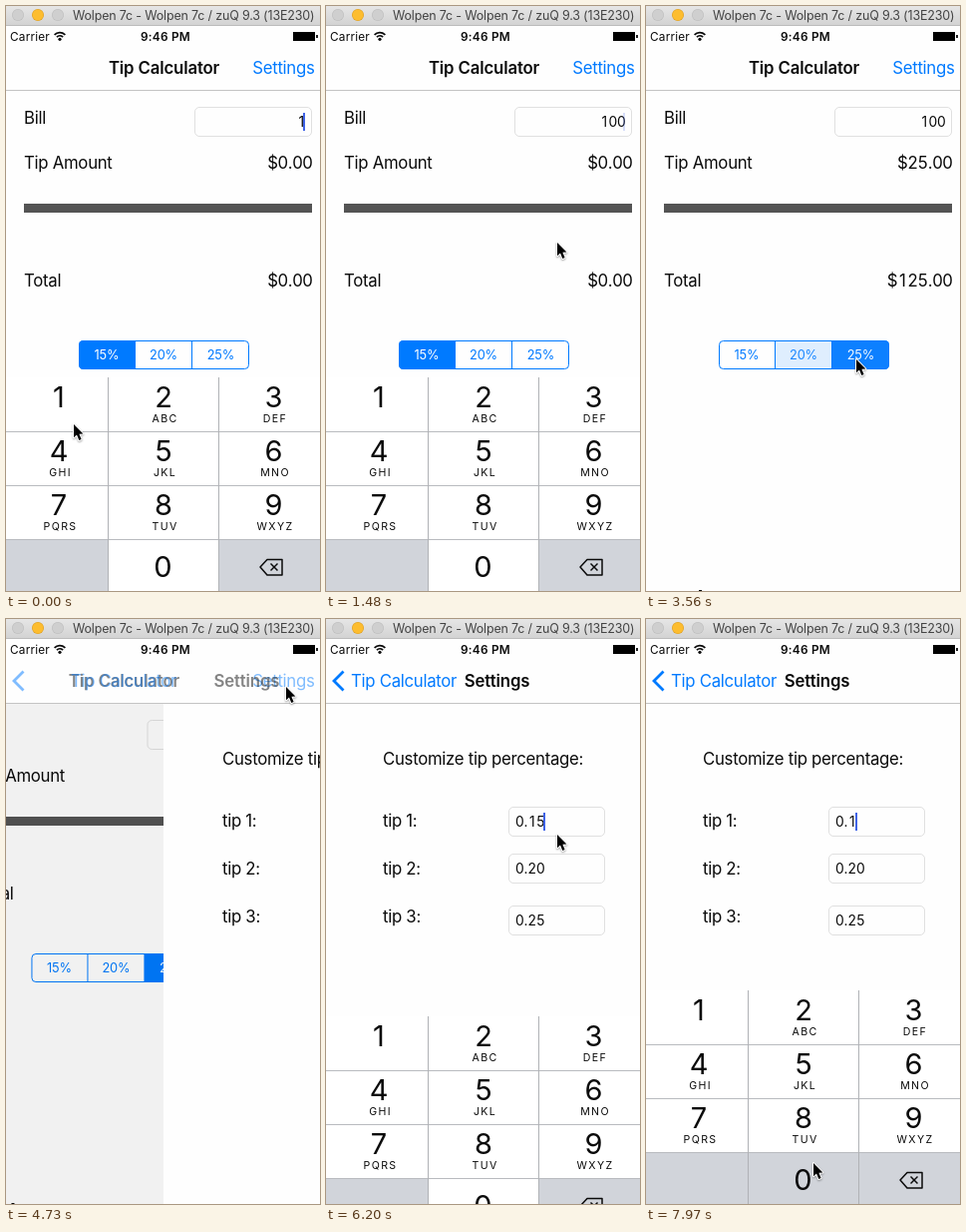
These frames come from a looping animation (315x586 px, 8 s). An HTML page with a canvas:

```html
<!DOCTYPE html>
<html lang="en">
<head>
<meta charset="utf-8">
<title>Tip Calculator</title>
<style>
html, body { margin: 0; width: 100%; height: 100%; overflow: hidden; background: #fefefe; }
canvas { display: block; width: 315px; height: 586px; }
</style>
</head>
<body>
<canvas id="stage"></canvas>
<script>
const W = 315, H = 586, LOOP = 8000, STEP = 147.75;
const BLUE = '#007aff', PAPER = '#fefefe', INK = '#0a0a0a', KEY_GREY = '#d1d4da';
const canvas = document.getElementById('stage');
const ratio = window.devicePixelRatio || 1;
canvas.width = W * ratio;
canvas.height = H * ratio;
const ctx = canvas.getContext('2d');

// Moments of the interaction, in ms
const DISMISS = 1625, PICK_20 = 2500, PICK_25 = 3302, PUSH = 4623, FOCUS = 5977, ERASE = 7640;
const zeroPresses = [[620, 800], [900, 1060], [7940, 8000]];
const erasePresses = [[7440, ERASE]];

const pointerPath = [
  [0, 68, 419], [140, 68, 419], [600, 159, 556], [1070, 159, 556], [1470, 232, 237],
  [1800, 232, 237], [2420, 159, 352], [2760, 159, 352], [3200, 211, 354], [3640, 211, 354],
  [4350, 281, 68], [5060, 281, 68], [5740, 232, 216], [6380, 232, 216], [7080, 264, 558],
  [7650, 264, 558], [7950, 168, 545], [8000, 168, 545]
];

const clamp = v => Math.max(0, Math.min(1, v));
const mix = (a, b, p) => a + (b - a) * p;
const within = (t, spans) => spans.some(([from, to]) => t >= from && t < to);
const money = v => '$' + v.toFixed(2);

// Critically damped spring, 0 to 1
function spring(t, start) {
  const x = Math.max(0, t - start) * 0.016;
  return 1 - (1 + x) * Math.exp(-x);
}

function pointerAt(t) {
  const i = Math.max(1, pointerPath.findIndex(p => p[0] >= t));
  const [t0, x0, y0] = pointerPath[i - 1], [t1, x1, y1] = pointerPath[i];
  const p = clamp((t - t0) / (t1 - t0)), e = p * p * (3 - 2 * p);
  return [mix(x0, x1, e), mix(y0, y1, e)];
}

function setType(size, weight, track) {
  ctx.font = `${weight} ${size}px Inter, Roboto, sans-serif`;
  ctx.letterSpacing = track + 'px';
}

function text(str, x, y, { size = 16.8, color = INK, weight = 400, align = 'left', track = -0.3 } = {}) {
  setType(size, weight, track);
  ctx.textAlign = align;
  ctx.fillStyle = color;
  ctx.fillText(str, x, y);
}

// Numbers with digits of equal width; returns the total width
function figures(str, x, y, { size = 16.8, align = 'left', track = -0.4 } = {}) {
  setType(size, 400, track);
  const widthOf = c => ctx.measureText(c).width;
  const cells = [...str].map(c => /\d/.test(c) ? widthOf('0') : widthOf(c));
  const total = cells.reduce((sum, w) => sum + w, 0);
  let left = align === 'right' ? x - total : x;
  ctx.textAlign = 'left';
  ctx.fillStyle = INK;
  [...str].forEach((c, i) => {
    ctx.fillText(c, left + (cells[i] - widthOf(c)) / 2, y);
    left += cells[i];
  });
  return total;
}

function box(x, y, w, h, color) {
  ctx.fillStyle = color;
  ctx.fillRect(x, y, w, h);
}

function outline(x, y, w, h, color, r = 4.5) {
  ctx.beginPath();
  ctx.roundRect(x + 0.5, y + 0.5, w - 1, h - 1, r);
  ctx.strokeStyle = color;
  ctx.lineWidth = 1;
  ctx.stroke();
}

function polyline(points, close) {
  ctx.beginPath();
  points.forEach(([x, y]) => ctx.lineTo(x, y));
  if (close) ctx.closePath();
}

function disc(x, y, r, color) {
  ctx.beginPath();
  ctx.arc(x, y, r, 0, 7);
  ctx.fillStyle = color;
  ctx.fill();
}

function layer(alpha, dx, dy, draw) {
  if (alpha <= 0) return;
  ctx.save();
  ctx.globalAlpha *= alpha;
  ctx.translate(dx, dy);
  draw();
  ctx.restore();
}

function caret(x, y, t, since) {
  const phase = (((t - since) % 1000) + 1000) % 1000;
  const alpha = phase < 900 ? 1 - clamp((phase - 370) / 60) : clamp((phase - 900) / 60);
  layer(alpha, 0, 0, () => box(x, y, 2, 18, '#3f63e6'));
}

function windowBar() {
  const shade = ctx.createLinearGradient(0, 0, 0, 20);
  shade.addColorStop(0, '#e6e6e6');
  shade.addColorStop(1, '#d2d2d2');
  box(0, 0, W, 19, shade);
  box(0, 19, W, 1, '#bcbcbc');
  ['#cfcfcf', '#fdbd2f', '#cfcfcf'].forEach((color, i) => {
    disc(12 + i * 20, 9, 6, i === 1 ? '#dfa023' : '#bdbdbd');
    disc(12 + i * 20, 9, 5.4, color);
  });
  text('Wolpen 7c - Wolpen 7c / zuQ 9.3 (13E230)', 67, 14, { size: 12.5, color: '#444', track: -0.18 });
}

function statusBar() {
  text('Carrier', 4, 34.5, { size: 11.8, track: 0.2 });
  ctx.strokeStyle = INK;
  ctx.lineWidth = 1.7;
  [4.2, 7.4].forEach(r => {
    ctx.beginPath();
    ctx.arc(54, 34, r, -Math.PI * 0.76, -Math.PI * 0.24);
    ctx.stroke();
  });
  disc(54, 33.3, 1.6, INK);
  text('9:46 PM', 160, 34.5, { size: 11.8, weight: 600, align: 'center', track: 0.25 });
  box(288, 26, 22, 9, '#000');
  box(311, 29, 2, 3, '#222');
}

function navBar(t, push) {
  box(0, 20, W, 64, PAPER);
  box(0, 84, W, 1, '#c4c4c4');
  statusBar();
  const bold = { weight: 600, align: 'center', track: -0.15 };
  layer(1 - push, mix(0, -80, push), 0, () => text('Tip Calculator', 158.5, 68, bold));
  const pressed = t > 4440 && t < PUSH ? 0.3 : 1;
  layer((1 - push) * pressed, 0, 0, () => text('Settings', 309.5, 68, { color: BLUE, align: 'right' }));
  layer(push, mix(80, 0, push), 0, () => text('Tip Calculator', 25, 68, { color: BLUE }));
  layer(push, mix(140, 0, push), 0, () => text('Settings', 171.5, 68, bold));
  layer(push, 0, 0, () => {
    polyline([[17.5, 52.5], [8, 62], [17.5, 71.5]]);
    ctx.lineJoin = 'miter';
    ctx.strokeStyle = BLUE;
    ctx.lineWidth = 2.8;
    ctx.stroke();
  });
}

function segments(t) {
  const fade1 = t < PICK_20 ? 1 : Math.exp((PICK_20 - t) / 115);
  const fade2 = t < PICK_25 ? 1 : Math.exp((PICK_25 - t) / 115);
  const rise = fade => 1 - fade ** 1.4;
  const fills = [fade1, t < PICK_25 ? rise(fade1) : fade2, rise(fade2)];
  const edges = [73, 129.5, 186.5, 244];
  ctx.save();
  ctx.beginPath();
  ctx.roundRect(73, 335, 171, 29, 4.5);
  ctx.clip();
  fills.forEach((f, i) => layer(f, 0, 0, () => box(edges[i], 335, edges[i + 1] - edges[i], 29, BLUE)));
  ctx.restore();
  box(129, 335, 1, 29, BLUE);
  box(186, 335, 1, 29, BLUE);
  outline(73, 335, 171, 29, BLUE, 4);
  fills.forEach((f, i) => {
    const color = f < 0.5 ? BLUE : '#fff';
    layer(f < 0.5 ? 1 - f : f, 0, 0, () =>
      text(['15%', '20%', '25%'][i], [101, 158, 215.5][i], 354, { size: 12.8, color, align: 'center', track: -0.1 }));
  });
}

function calculatorPage(t) {
  const right = { align: 'right' };
  const bill = t < 800 ? 1 : t < 1060 ? 10 : 100;
  const rate = t < DISMISS ? 0 : t < PICK_20 ? 0.15 : t < PICK_25 ? 0.2 : 0.25;
  box(-2, 85, 320, 501, PAPER);
  text('Bill', 18, 118);
  outline(189, 101, 118, 30, '#e0e0e0');
  figures(String(bill), 300.5, 121, { size: 13.8, align: 'right', track: -0.2 });
  if (t < DISMISS) caret(298, 107, t, t < 800 ? -100 : t < 1060 ? 800 : 1060);
  text('Tip Amount', 18, 163);
  figures(money(bill * rate), 307.5, 163, right);
  box(18, 198, 289, 9, '#545454');
  text('Total', 18, 281);
  figures(money(rate ? bill * (1 + rate) : 0), 307.5, 281, right);
  segments(t);
  if (t > DISMISS + 500) box(53, 585, 3, 1, INK);
}

function settingsPage(t) {
  box(-2, 85, 320, 501, PAPER);
  text('Customize tip percentage:', 57, 146);
  [t < ERASE ? '0.15' : '0.1', '0.20', '0.25'].forEach((value, i) => {
    const top = [188, 235, 287][i];
    text(`tip ${i + 1}:`, 57, 208 + 48 * i);
    outline(183, top, 97, 30, '#e0e0e0');
    const width = figures(value, 190, top + 20, { size: 13.8, track: -0.15 });
    if (i === 0 && t >= FOCUS) caret(Math.round(189 + width), 194, t, t < ERASE ? FOCUS : ERASE);
  });
}

function eraseIcon() {
  polyline([[255, 562], [262, 554.5], [277, 554.5], [277, 570], [262, 570]], true);
  ctx.strokeStyle = INK;
  ctx.lineWidth = 1.5;
  ctx.lineJoin = 'round';
  ctx.stroke();
  [[265.5, 272.5], [272.5, 265.5]].forEach(([a, b]) => {
    polyline([[a, 558.5], [b, 565.5]]);
    ctx.stroke();
  });
}

function keyboard(t) {
  box(0, 372, W, 214, '#fff');
  box(0, 535, 102, 51, KEY_GREY);
  if (!within(t, erasePresses)) box(214, 535, 101, 51, KEY_GREY);
  if (within(t, zeroPresses)) box(103, 535, 110, 51, KEY_GREY);
  [426, 480, 534].forEach(y => box(0, y, W, 1, '#b9bbbf'));
  [102, 213].forEach(x => box(x, 372, 1, 214, '#b0b2b6'));
  const digit = { size: 29, align: 'center', track: 0 };
  const columns = [53, 158, 268.5];
  ['', 'ABC', 'DEF', 'GHI', 'JKL', 'MNO', 'PQRS', 'TUV', 'WXYZ'].forEach((letters, i) => {
    const x = columns[i % 3], y = 402 + 54 * Math.floor(i / 3);
    text(i + 1, x, y, digit);
    text(letters, x + 1.5, y + 15, { size: 10.6, align: 'center', track: 1.35 });
  });
  text('0', 157.5, 571.5, digit);
  eraseIcon();
}

function pointer(t) {
  const [x, y] = pointerAt(t);
  layer(1, x, y, () => {
    polyline([[0, 0], [0, 13.2], [3, 10.6], [5.3, 16], [7.6, 15], [5.4, 9.8], [9.4, 9.6]], true);
    ctx.lineJoin = 'round';
    ctx.shadowColor = 'rgba(0,0,0,.35)';
    ctx.shadowBlur = 2 * ratio;
    ctx.shadowOffsetY = ratio;
    ctx.strokeStyle = '#fff';
    ctx.lineWidth = 2;
    ctx.stroke();
    ctx.shadowColor = 'transparent';
    ctx.fillStyle = '#000';
    ctx.fill();
  });
}

function draw(t) {
  const push = spring(t, PUSH);
  ctx.setTransform(ratio, 0, 0, ratio, 0, 0);
  box(0, 0, W, H, PAPER);
  if (push < 0.999) {
    layer(1, -95 * push, 0, () => calculatorPage(t));
    box(0, 85, W, 501, `rgba(0,0,0,${0.1 * push})`);
  }
  if (push > 0) layer(1, Math.round(320 * (1 - push)), 0, () => settingsPage(t));
  const hidden = t < FOCUS ? spring(t, DISMISS) : 1 - spring(t, FOCUS);
  if (hidden < 0.99 && (t < PUSH || t >= FOCUS)) layer(1, 0, Math.round(214 * hidden), () => keyboard(t));
  navBar(t, push);
  windowBar();
  pointer(t);
}

function tick() {
  const t = performance.now() % LOOP;
  draw(Math.floor((t + 10) / STEP) * STEP);
  requestAnimationFrame(tick);
}
tick();
</script>
</body>
</html>
```
